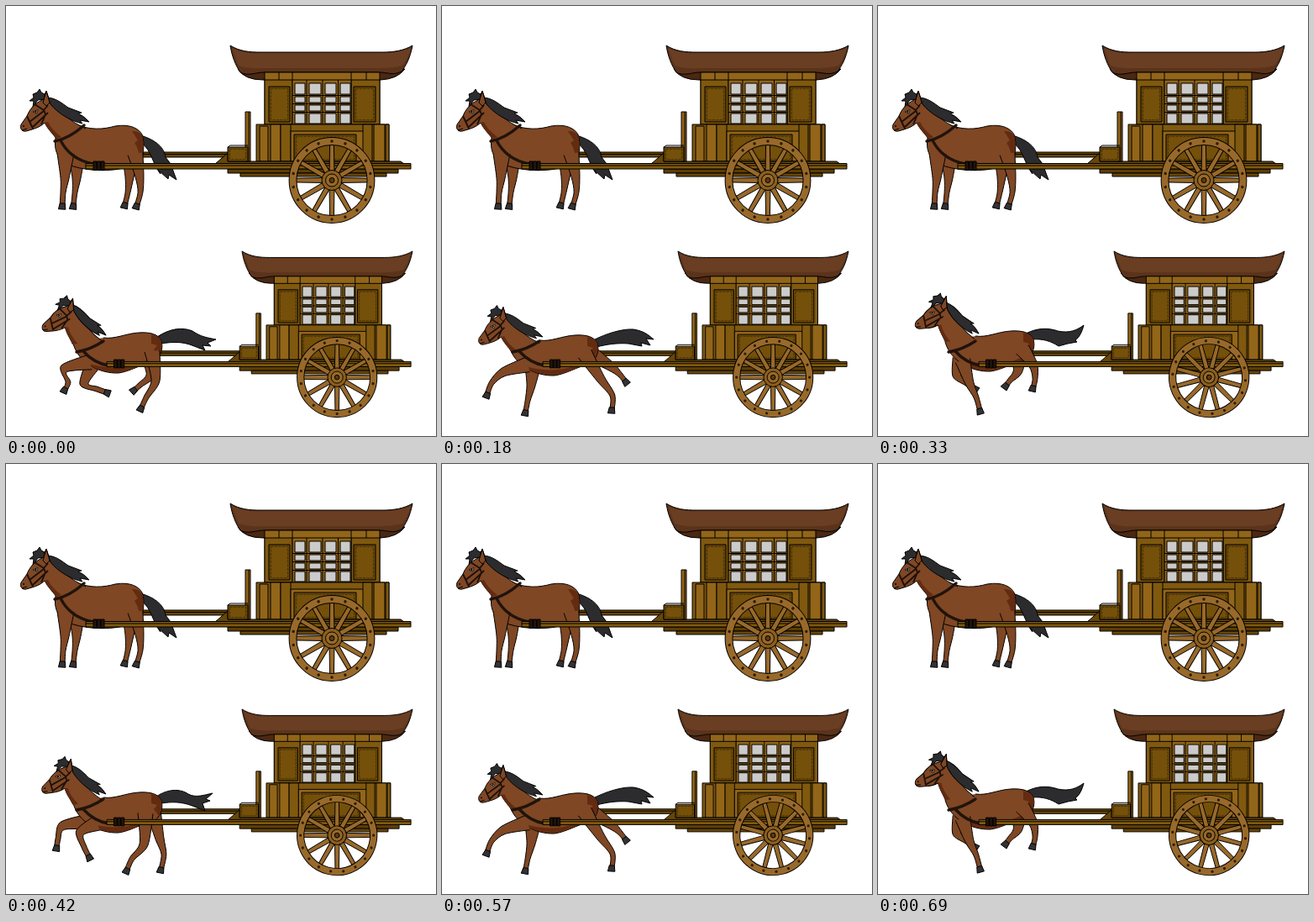
An HTML page for the animation above (0.72 s loop, 512 px wide and 512 px high).

```html
<!DOCTYPE html>
<html lang="en">
<head>
<meta charset="utf-8">
<title>Horse carriages</title>
<style>
html, body { margin: 0; width: 100%; height: 100%; overflow: hidden; background: #fff; }
svg { display: block; width: 512px; height: 512px; }
.o { stroke: #000; stroke-width: 1; stroke-linejoin: round; }
.l { fill: none; stroke: #000; stroke-width: 1; }
.strap { fill: none; stroke: #21130b; stroke-width: 3.4; stroke-linecap: round; stroke-linejoin: round; }
.rein { fill: none; stroke: #1d100a; stroke-width: 1.9; stroke-linejoin: round; }
</style>
</head>
<body>
<svg id="stage" viewBox="0 0 512 512"></svg>
<script>
const COAT = '#7f4724', SHADE = '#632b10', HAIR = '#2c2c2e', HOOF = '#333335';
const WOOD = '#80590f', LIGHT = '#926518', DARK = '#684607', RIM = '#98692a';
const SMALL = 0.9355;

const path = (d, fill, cls = 'o') => `<path class="${cls}" d="${d}" fill="${fill}"/>`;
const line = (d, cls = 'l') => `<path class="${cls}" d="${d}"/>`;
const box = (x, y, w, h, fill) =>
  `<rect class="o" x="${x}" y="${y}" width="${w}" height="${h}" fill="${fill}"/>`;
const disc = (r, fill) => `<circle class="o" r="${r}" fill="${fill}"/>`;
const group = (transform, ...parts) => `<g transform="${transform}">${parts.join('')}</g>`;
const range = (n, f) => Array.from({ length: n }, (_, i) => f(i)).join('');

// Inlaid panel with a carved border
const inlay = (x, y, w, h) => box(x, y, w, h, DARK) +
  `<rect x="${x + 2.5}" y="${y + 2.5}" width="${w - 5}" height="${h - 5}" fill="#74500b"
    stroke="#4d3504" stroke-width="1.2" stroke-dasharray="3 1.5"/>`;

const wheel = id => group('translate(388 207.5)', `<g id="${id}">
  ${range(12, i => group(`rotate(${i * 30})`, path('M-3,-8 L-2.4,-43 H2.4 L3,-8Z', RIM)))}
  <circle r="46.5" fill="none" stroke="#000" stroke-width="9.8"/>
  <circle r="46.5" fill="none" stroke="${RIM}" stroke-width="7.8"/>
  ${range(18, i => `<circle cy="-46.5" r="1.7" fill="#2b1c05" transform="rotate(${i * 20})"/>`)}
  ${disc(12, '#8b5f1d')}${disc(7.5, RIM)}${disc(3, '#5b3c0c')}</g>`);

const farShaft = box(160, 174, 112, 6, DARK) + line('M160,176.5H272');

const roof =
  path('M276,75 Q284,88 306,88 H446 Q466,87 475,75 L446,78 H306Z', '#4a2812') +
  path('M267,47 C278,54 290,55 303,55 H448 C462,55 474,53 484,47 C481,63 476,71 471,78 ' +
    'C461,83 453,79 446,79 H306 C298,79 288,84 279,79 C273,70 269,60 267,47Z', '#5b331b') +
  '<path d="M269,50 C280,56 292,57 303,56 H448 C462,56 473,54 482,50 Q479,62 472,71 Q460,74 446,74 H306 Q290,75 277,71Z" fill="#6a3e22"/>';

const cart = wheelId => [
  // cabin
  box(308, 79, 137, 64, WOOD),
  roof,
  box(308, 79, 137, 9.5, LIGHT), line('M341,79V88 M411,79V88 M325,79V88 M429,79V88'),
  box(308, 88, 33, 53, WOOD), box(411, 88, 34, 53, WOOD),
  inlay(313, 96, 25, 42), inlay(414, 96, 26, 42),
  box(341, 88, 70, 53, LIGHT),
  range(4, c => range(4, r =>
    box([344, 361, 380, 398][c], [92, 108, 118, 128][r], [12, 14, 13, 12][c], [13, 7, 7, 12][r], '#cbcbcb'))),
  line('M341,106.5H411 M341,116.5H411 M341,126.5H411 M358,88V141 M377,88V141 M395.5,88V141'),
  // lower wall
  box(298, 141, 158, 44, WOOD),
  box(302, 143, 10, 42, LIGHT), box(315, 141, 12, 44, LIGHT), box(327, 141, 12, 44, WOOD),
  box(339, 149, 91, 36, LIGHT), inlay(343, 153, 74, 32),
  box(425, 141, 11, 44, WOOD), box(438, 141, 13, 44, LIGHT), box(452, 141, 4, 44, WOOD),
  // seat and bed
  path('M249,188 L264,175 V185 H470 L474,188Z', DARK),
  box(285, 126, 6, 59, LIGHT), line('M289,126V185'),
  inlay(264, 168, 24, 17), line('M264,168 L267,166 H288'),
  box(264, 194, 203, 5, '#5d3d06'), box(279, 199, 174, 4, DARK),
  box(95, 187.5, 387, 6.5, WOOD), line('M95,190H482'),
  [104, 108.5, 113].map(x => box(x, 185, 4, 10.5, '#21140c')).join(''),
  wheel(wheelId)
].join('');

const neck = [
  path('M95,146 C77,138 63,125 52,113 L48,101 L43,112 C34,116 28,123 25,131 L18,141 ' +
    'C16,147 20,150 24,149 L31,147 C38,145 43,142 46,139 C50,147 55,151 60,158', COAT),
  '<path d="M46,139 C50,147 55,151 60,158 L66,156 Q54,147 50,138Z" fill="' + SHADE + '"/>',
  path('M50,109 C60,110 67,116 74,121 L90,127 L86,128 Q93,131 99,138 L88,136 L91,140 C77,137 62,128 53,117Z', HAIR),
  path('M28,113 L33,109 L32,105 L37,103 L40,99 L42,103 L46,105 L46,111 L38,112 L32,120 L33,113Z', HAIR),
  path('M44,115 L48,101 L52,115 L48,119Z', COAT),
  line('M25,131 L32,146 M28,138 L45,125 M34,117 L45,124 L50,118 M45,124 L47,129 L42,141 M32,144 L50,127', 'rein'),
  '<path d="M32,126 L38,123.500 L37,128Z" fill="#fff" stroke="#000" stroke-width=".8"/>',
  '<circle cx="35.500" cy="125.800" r="1.2"/><circle cx="21" cy="143" r="1"/>',
  line('M19,148 L25,146')
].join('');

// Smooth curve through points, without the initial move
const spline = p => p.slice(1).map((q, i) => {
  const a = p[i - 1] || p[i], b = p[i], c = p[i + 2] || q;
  return `C${b.map((v, k) => v + (q[k] - a[k]) / 7)} ${q.map((v, k) => v - (c[k] - b[k]) / 7)} ${q}`;
}).join('');

// Tapered leg along four joints, ending in a hoof
function leg(joints, widths = [9, 5, 2.9, 2.7]) {
  const p = joints.split(' ').map(s => s.split(',').map(Number));
  const dirs = p.map((_, i) => {
    const a = p[Math.max(i - 1, 0)], b = p[Math.min(i + 1, 3)];
    const n = Math.hypot(b[0] - a[0], b[1] - a[1]);
    return [(b[0] - a[0]) / n, (b[1] - a[1]) / n];
  });
  const at = (i, side, along = 0) => [
    p[i][0] + dirs[i][0] * along - dirs[i][1] * side,
    p[i][1] + dirs[i][1] * along + dirs[i][0] * side];
  const left = p.map((_, i) => at(i, widths[i])), right = p.map((_, i) => at(i, -widths[i])).reverse();
  return path(`M${left[0]}${spline(left)}L${right[0]}${spline(right)}`, COAT) +
    path(`M${at(3, 3, -5)}L${at(3, 4.5, 2)} ${at(3, -4, 2)} ${at(3, -3, -5)}Z`, HOOF);
}

const standing = [
  path('M160,154 C174,158 188,166 190,180 L196,188 L203,207 L194,201 L193,206 L182,196 L184,200 C174,188 174,172 161,163Z', HAIR),
  leg('84,182 84,205 82,222 80,240'), leg('148,184 147,204 145,222 141,239'),
  path('M84,141 C100,148 116,147 130,143 C148,140 158,146 162,153 C166,164 163,178 160,190 ' +
    'L140,193 C120,198 90,196 72,188 C60,180 57,170 59,157', COAT),
  `<path d="M150,149 Q160,148 163,157 Q165,170 160,182 Q157,168 153,163 L157,160Z" fill="${SHADE}"/>`,
  leg('71,176 70,205 68,222 67,240', [10, 5, 3, 3]), leg('154,176 159,203 160,222 155,240'),
  neck,
  line('M58,161 Q75,158 93,142 M65,160 C74,178 88,185 104,188', 'strap')
].join('');

const barrel =
  path('M116,395 C130,397 142,390 158,389 C172,388 182,391 185,399 C188,409 183,419 176,423 ' +
    'C160,427 148,435 134,437 C112,438 86,425 80,402', COAT) +
  `<path d="M134,436 C120,437 104,432 95,425 Q118,432 138,430 Q155,428 172,420 L176,423 C160,427 148,435 134,436Z
    M173,391 Q183,393 185,399 Q187,409 182,417 L176,409 L180,404 L173,402Z" fill="${SHADE}"/>`;

// lift: body offset; head: pivot and angle of the neck; legs: far pair, then near pair
const gallop = [
  { lift: 0, head: [119, 392, 12],
    tail: 'M180,394 C195,384 210,382 222,387 C232,394 240,395 250,397 L240,401 L244,405 L234,404 L237,410 L224,405 C210,399 198,400 184,402Z',
    legs: ['104,426 93,450 108,456 122,461', '170,418 172,440 160,451 151,459', '100,424 69,432 74,448 69,459', '174,411 178,446 167,466 160,481'] },
  { lift: 2, head: [119, 393, 9],
    tail: 'M179,396 C192,387 207,386 217,393 C226,398 236,394 246,392 L238,399 L243,401 L234,404 L237,413 L222,407 C208,402 198,402 185,404Z',
    legs: ['98,426 67,431 62,446 60,459', '175,411 183,446 188,465 184,485', '108,428 88,439 93,456 100,470', '166,416 164,453 150,470 143,486'] },
  { lift: 6, head: [121, 392, 3],
    tail: 'M180,401 C195,391 209,386 222,388 C232,393 234,400 244,407 L235,406 L240,412 L228,409 L231,413 L218,407 C206,402 196,407 185,410Z',
    legs: ['104,431 88,452 74,471 64,487', '177,414 190,449 203,468 209,488', '100,430 70,437 77,452 74,469', '172,412 181,450 179,470 177,489'] },
  { lift: 3, head: [120, 394, 1],
    tail: 'M178,399 C195,390 215,384 228,385 C240,387 245,391 252,397 L243,396 L248,404 L237,401 L238,405 L222,402 C208,401 196,403 184,406Z',
    legs: ['108,430 106,452 102,470 99,486', '178,414 202,430 212,439 220,449', '102,427 73,436 59,449 53,465', '170,414 189,444 203,464 202,483'] },
  { lift: 0, head: [120, 392, 7],
    tail: 'M178,393 C195,386 212,386 225,388 C236,390 240,388 249,388 L241,394 L246,398 L235,399 L232,404 L220,402 C207,402 196,399 184,401Z',
    legs: ['98,424 84,441 78,456 83,471', '175,416 191,432 197,443 205,451', '104,426 110,455 113,472 112,487', '173,412 194,435 199,451 196,466'] },
  { lift: -2, head: [120, 390, 13],
    tail: 'M176,390 C190,383 203,383 214,387 C228,390 237,386 245,380 C243,388 240,394 235,398 L237,400 L226,402 L215,405 C206,399 196,396 184,397Z',
    legs: ['98,420 94,440 105,449 117,457', '168,417 166,436 157,446 151,454', '101,422 109,449 117,466 122,484', '172,409 185,428 187,444 184,457'] }
];

const galloper = ({ lift, head: [x, y, angle], tail, legs }) => [
  path(tail, HAIR), leg(legs[0]), leg(legs[1]),
  group(`translate(0 ${lift})`, barrel),
  leg(legs[2]), leg(legs[3]),
  group(`translate(${x} ${y}) rotate(${angle}) scale(${SMALL}) translate(-99 -138)`, neck),
  line('M84,412 Q101,409 116,399 M92,411 C100,420 110,426 122,428', 'strap')
].join('');

const lower = `translate(31.2 248) scale(${SMALL})`;
const stage = document.getElementById('stage');
stage.innerHTML = farShaft + standing + cart('still') +
  group(lower, farShaft) +
  gallop.map(pose => `<g class="pose">${galloper(pose)}</g>`).join('') +
  group(lower, cart('rolling'));

const poses = stage.querySelectorAll('.pose');
const rolling = document.getElementById('rolling');

function draw() {
  const step = Math.floor(performance.now() / 30) % 24;
  const current = Math.floor(step / 2) % poses.length;
  poses.forEach((pose, i) => { pose.style.display = i === current ? '' : 'none'; });
  rolling.setAttribute('transform', `rotate(${-15 * step})`);
  requestAnimationFrame(draw);
}
draw();
</script>
</body>
</html>
```
